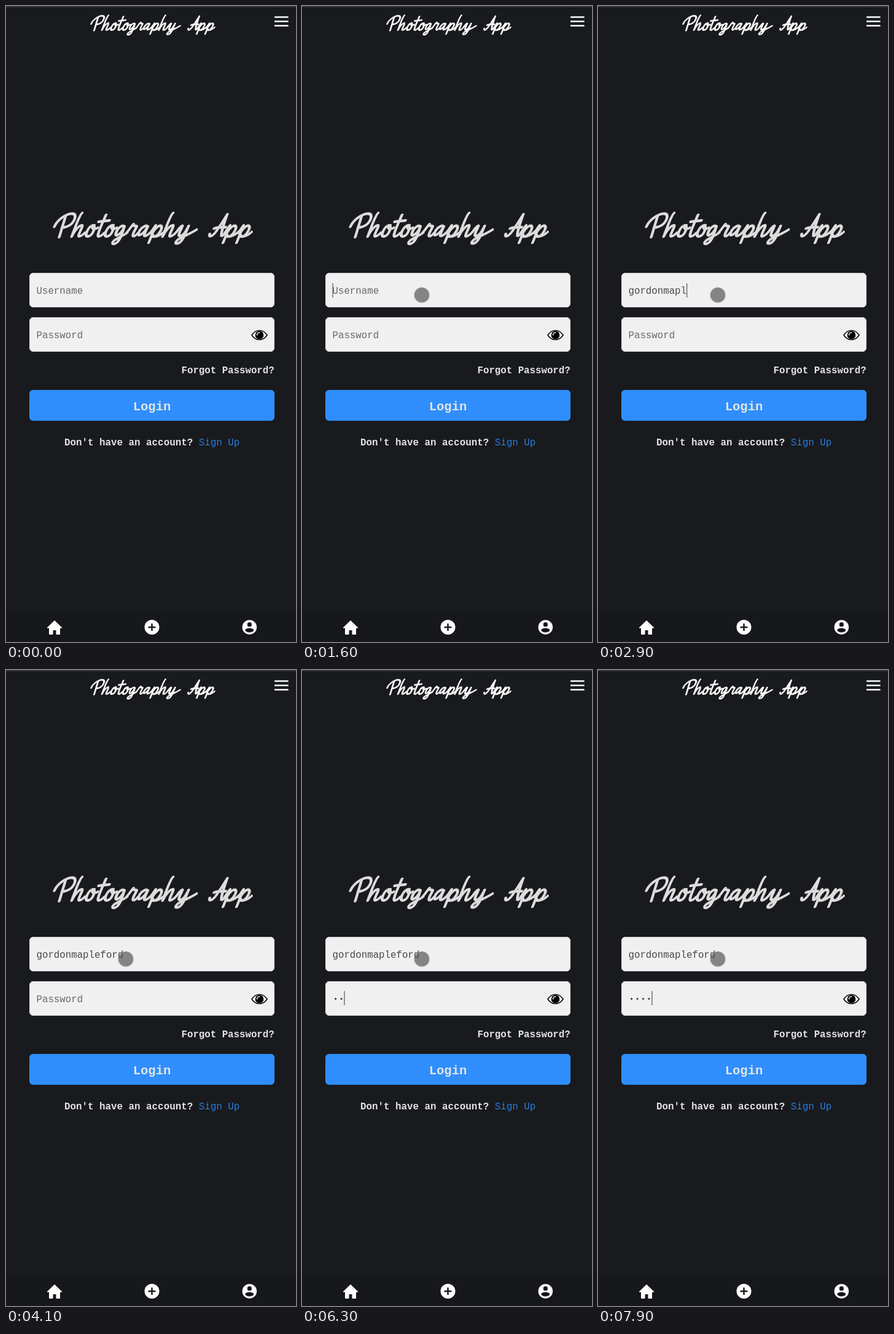
Write an HTML page that moves like this. It is 472 by 1032 pixels and loops after 8000 ms.

```html
<!DOCTYPE html>
<html lang="en">
<head>
<meta charset="utf-8">
<title>Login</title>
<style>
html, body { margin: 0; width: 100%; height: 100%; overflow: hidden; background: #181a1d; }
svg { display: block; width: 472px; height: 1032px; }
text { font-family: "Liberation Mono", "DejaVu Sans Mono", monospace; font-size: 15.75px; white-space: pre; }
.bold { font-weight: bold; fill: #e4e4e4; }
.script { fill: none; stroke: #dcdcdc; stroke-width: 4.5; stroke-linecap: round; stroke-linejoin: round; }
.field { fill: #f0f0f0; stroke: #d2d3d5; }
.caret { fill: #555; }
</style>
</head>
<body>
<svg viewBox="0 0 472 1032">
  <defs><g id="title" transform="translate(0 374) skewX(-20)"></g></defs>
  <rect width="472" height="1032" fill="#181a1d"/>
  <rect width="472" height="2" fill="#35373a"/>
  <rect y="982" width="472" height="50" fill="#17181c"/>

  <use href="#title" class="script"/>
  <use href="#title" class="script" transform="translate(89.2 -195) scale(.626)" style="stroke:#f6f6f6"/>
  <path d="M437 18h22.500M437 25h22.500M437 32h22.500" stroke="#fff" stroke-width="2.7"/>

  <rect class="field" x="38.500" y="433.500" width="398" height="55" rx="5.500"/>
  <rect class="field" x="38.500" y="505.500" width="398" height="55" rx="5.500"/>
  <text id="user" x="49.500" y="467"></text>
  <text id="hint" x="49.500" y="539" fill="#686868">Password</text>
  <g id="dots" fill="#333"></g>
  <rect id="userCaret" class="caret" y="450" width="1.200" height="23"/>
  <rect id="passCaret" class="caret" y="521" width="1.200" height="23"/>

  <g transform="translate(412.5 534)">
    <path d="M-12.500 0C-6-10 6-10 12.500 0C6 10-6 10-12.500 0Z" fill="#f4f4f4" stroke="#111" stroke-width="1.7"/>
    <circle r="6.800" fill="#000"/>
    <path d="M-4 0A4 4 0 0 1 0-4" fill="none" stroke="#fff" stroke-width="1.500" stroke-linecap="round"/>
  </g>

  <text class="bold" x="285.500" y="595.500">Forgot Password?</text>
  <rect x="38" y="623" width="399" height="50" rx="6" fill="#2f8efc"/>
  <text class="bold" x="237.500" y="655.500" text-anchor="middle" style="font-size:20.5px">Login</text>
  <text class="bold" x="95" y="713" style="font-size:15.85px">Don't have an account? <tspan fill="#2a7ee0" font-weight="normal">Sign Up</tspan></text>

  <g fill="#fff">
    <path d="M79 997.500L91 1009H87.500V1019.500H82V1012.500H76V1019.500H70.500V1009H67Z" stroke="#fff" stroke-linejoin="round"/>
    <circle cx="237.500" cy="1008" r="12"/>
    <circle cx="396.300" cy="1008" r="11.800"/>
  </g>
  <path d="M231.500 1008h12M237.500 1002v12" stroke="#17181c" stroke-width="2.400"/>
  <g fill="#17181c">
    <circle cx="396.300" cy="1003.700" r="3.600"/>
    <path d="M389 1013C390 1008.300 402.600 1008.300 403.600 1013C400 1017.800 392.600 1017.800 389 1013Z"/>
  </g>
  <circle id="touch" cx="195" cy="469" r="12" fill="#555" fill-opacity=".7" stroke="#888" stroke-opacity=".45" stroke-width="1.500"/>
</svg>
<script>
const NS = "http://www.w3.org/2000/svg";
const $ = id => document.getElementById(id);
const LOOP = 8000, LEFT = 49.5, STEP = 9.45;
const NAME = "gordonmapleford";

function add(parent, tag, attrs) {
  const el = document.createElementNS(NS, tag);
  for (const k in attrs) el.setAttribute(k, attrs[k]);
  return parent.appendChild(el);
}

// Upright pen strokes on a zero baseline; the group slants them
const pen = {
  P: "M3-33L5 1M-9-16C-8-30 6-38 13-37C22-36 21-21 13-17C9-15 6-14 4-15",
  h: "M4-38C2-36 1-20 1 0C2-10 7-19 11-18C14-17 10-4 12-1C14 1 18-2 20-6",
  o: "M10-18C3-19 1-10 2-4C3 2 11 1 12-7C13-14 10-18 8-18C8-12 13-11 17-14",
  t: "M5-35C4-20 2-8 4-2C6 2 10-1 13-6M-3-24L14-26",
  g: "M12-16C6-20 1-12 2-5C3 1 10-2 12-15C12-4 13 6 9 10C5 14 0 11 3 7C7 2 14 0 20-6",
  r: "M0-6C4-14 5-20 6-20C6-16 12-18 13-16C12-10 10-2 13-1C15 0 17-2 19-6",
  a: "M13-16C7-20 1-12 2-5C3 1 10-3 13-16C12-8 11-1 14-1C17-1 19-4 21-7",
  p: "M0-6L4-18L3 10M4-8C6-15 10-19 13-17C18-14 14 0 8 0C6 0 5-1 5-2M8 0C14 0 18-3 21-7",
  y: "M0-8C3-16 5-18 6-17C6-10 3-1 8-1C13-1 15-10 16-17C15-5 16 6 11 10C6 13 3 10 6 6C10 1 20-2 31-11",
  A: "M-1-4C0 2 5 0 8-8C11-17 14-28 16-36C16-24 16-8 19-2C20 0 22-2 24-6M3-13C9-16 15-15 21-15"
};
const starts = [82, 106, 127, 145, 158, 175, 194, 212, 233, 254, 275, 331, 354, 376];
[..."PhotographyApp"].forEach((c, i) =>
  add($("title"), "path", { d: pen[c], transform: `translate(${starts[i]})` }));

const dots = Array.from({ length: 4 }, (_, i) =>
  add($("dots"), "circle", { cx: LEFT + STEP * (i + 0.54), cy: 533.5, r: 1.5 }));

// [time, password length]
const keys = [[4200, 0], [4300, 1], [4600, 2], [4900, 3], [6300, 2], [6400, 3],
  [6800, 2], [6900, 1], [7000, 0], [7200, 1], [7600, 2], [7800, 3], [7900, 4]];

const show = (el, on) => el.setAttribute("visibility", on ? "visible" : "hidden");
const lit = age => age % 1000 < 500;

function caret(el, on, count) {
  show(el, on);
  el.setAttribute("x", LEFT + STEP * count);
}

function draw(t) {
  const typed = t < 2000 ? 0 : Math.min(NAME.length, Math.floor((t - 2000) / 100) + 1);
  const userKey = t < 2000 ? 1200 : 2000 + (typed - 1) * 100;
  const user = $("user");
  user.textContent = typed ? NAME.slice(0, typed) : "Username";
  user.setAttribute("fill", typed ? "#484848" : "#686868");
  caret($("userCaret"), t >= 1200 && t < 4200 && lit(t - userKey), typed);

  const [at, count] = keys.filter(k => k[0] <= t).pop() || [0, 0];
  dots.forEach((d, i) => show(d, i < count));
  show($("hint"), !count);
  caret($("passCaret"), t >= 4200 && lit(t - at), count);

  show($("touch"), t >= 1000);
}

const begin = performance.now();
function tick() {
  draw((performance.now() - begin) % LOOP);
  requestAnimationFrame(tick);
}
tick();
</script>
</body>
</html>
```
